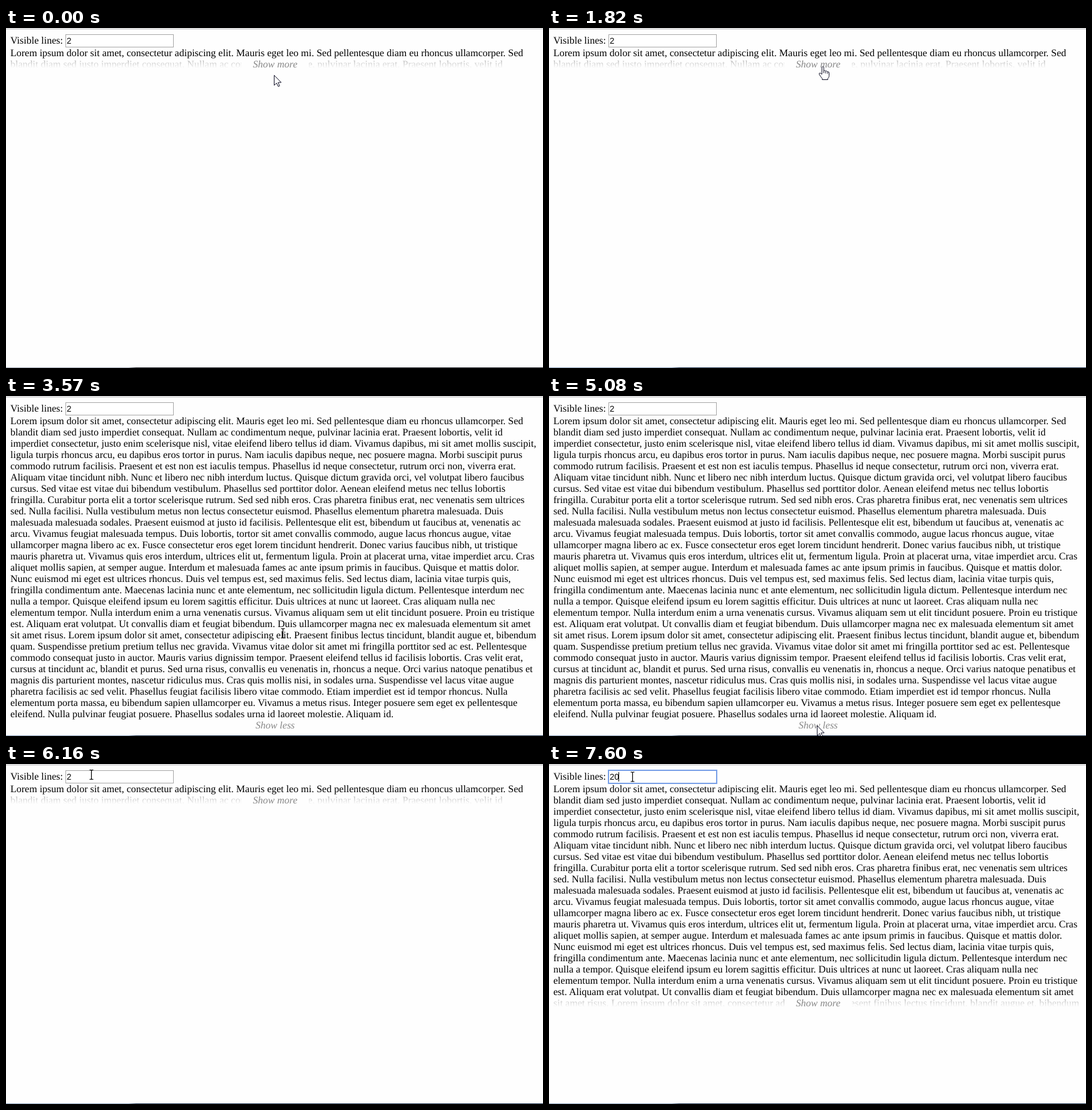
Animation, 858 px wide and 543 px high, one loop 8 s. Source, as an HTML page:

```html
<!DOCTYPE html>
<html lang="en">
<head>
<meta charset="utf-8">
<title>Show more, show less</title>
<style>
html, body { margin: 0; width: 100%; height: 100%; overflow: hidden; background: #fefefe; }
#stage { position: relative; width: 858px; height: 543px; overflow: hidden;
  font: 16px/18px "Liberation Serif", "Times New Roman", serif; color: #000; text-rendering: geometricPrecision; }
#stage > * { position: absolute; box-sizing: border-box; margin: 0; white-space: pre; }
#top { left: 0; top: 1px; width: 858px; height: 1px; background: #b0b0b3; }
#bottom { left: 0; top: 542px; width: 858px; height: 1px; }
#label { left: 7px; top: 12px; }
#field { left: 95px; top: 10px; width: 173px; height: 21px; border: 1px solid #a9a9a9; background: #fff;
  padding-left: 1px; font: 13.333px/19px "Liberation Sans", Arial, sans-serif; }
#field.focused { border-color: #6d97e4; box-shadow: 0 0 0 1px #87abeb; }
#caret { top: 13px; width: 1px; height: 15px; background: #000; }
#text { left: 7px; top: 31px; width: 851px; padding-top: 1px; overflow: hidden; font: inherit; }
#fade { left: 0; width: 858px; height: 18px;
  background: linear-gradient(rgba(254,254,254,.66), #fefefe 15px); }
#toggle { left: 376px; width: 108px; height: 18px; padding-top: 1px; text-align: center; font-style: italic;
  color: #888; background: #fefefe; }
#cursor { left: 0; top: 0; width: 858px; height: 543px; }
</style>
</head>
<body>
<div id="stage">
<div id="top"></div>
<div id="label">Visible lines:</div>
<div id="field"></div>
<div id="caret"></div>
<pre id="text">Lorem ipsum dolor sit amet, consectetur adipiscing elit. Mauris eget leo mi. Sed pellentesque diam eu rhoncus ullamcorper. Sed
blandit diam sed justo imperdiet consequat. Nullam ac condimentum neque, pulvinar lacinia erat. Praesent lobortis, velit id
imperdiet consectetur, justo enim scelerisque nisl, vitae eleifend libero tellus id diam. Vivamus dapibus, mi sit amet mollis suscipit,
ligula turpis rhoncus arcu, eu dapibus eros tortor in purus. Nam iaculis dapibus neque, nec posuere magna. Morbi suscipit purus
commodo rutrum facilisis. Praesent et est non est iaculis tempus. Phasellus id neque consectetur, rutrum orci non, viverra erat.
Aliquam vitae tincidunt nibh. Nunc et libero nec nibh interdum luctus. Quisque dictum gravida orci, vel volutpat libero faucibus
cursus. Sed vitae est vitae dui bibendum vestibulum. Phasellus sed porttitor dolor. Aenean eleifend metus nec tellus lobortis
fringilla. Curabitur porta elit a tortor scelerisque rutrum. Sed sed nibh eros. Cras pharetra finibus erat, nec venenatis sem ultrices
sed. Nulla facilisi. Nulla vestibulum metus non lectus consectetur euismod. Phasellus elementum pharetra malesuada. Duis
malesuada malesuada sodales. Praesent euismod at justo id facilisis. Pellentesque elit est, bibendum ut faucibus at, venenatis ac
arcu. Vivamus feugiat malesuada tempus. Duis lobortis, tortor sit amet convallis commodo, augue lacus rhoncus augue, vitae
ullamcorper magna libero ac ex. Fusce consectetur eros eget lorem tincidunt hendrerit. Donec varius faucibus nibh, ut tristique
mauris pharetra ut. Vivamus quis eros interdum, ultrices elit ut, fermentum ligula. Proin at placerat urna, vitae imperdiet arcu. Cras
aliquet mollis sapien, at semper augue. Interdum et malesuada fames ac ante ipsum primis in faucibus. Quisque et mattis dolor.
Nunc euismod mi eget est ultrices rhoncus. Duis vel tempus est, sed maximus felis. Sed lectus diam, lacinia vitae turpis quis,
fringilla condimentum ante. Maecenas lacinia nunc et ante elementum, nec sollicitudin ligula dictum. Pellentesque interdum nec
nulla a tempor. Quisque eleifend ipsum eu lorem sagittis efficitur. Duis ultrices at nunc ut laoreet. Cras aliquam nulla nec
elementum tempor. Nulla interdum enim a urna venenatis cursus. Vivamus aliquam sem ut elit tincidunt posuere. Proin eu tristique
est. Aliquam erat volutpat. Ut convallis diam et feugiat bibendum. Duis ullamcorper magna nec ex malesuada elementum sit amet
sit amet risus. Lorem ipsum dolor sit amet, consectetur adipiscing elit. Praesent finibus lectus tincidunt, blandit augue et, bibendum
quam. Suspendisse pretium pretium tellus nec gravida. Vivamus vitae dolor sit amet mi fringilla porttitor sed ac est. Pellentesque
commodo consequat justo in auctor. Mauris varius dignissim tempor. Praesent eleifend tellus id facilisis lobortis. Cras velit erat,
cursus at tincidunt ac, blandit et purus. Sed urna risus, convallis eu venenatis in, rhoncus a neque. Orci varius natoque penatibus et
magnis dis parturient montes, nascetur ridiculus mus. Cras quis mollis nisi, in sodales urna. Suspendisse vel lacus vitae augue
pharetra facilisis ac sed velit. Phasellus feugiat facilisis libero vitae commodo. Etiam imperdiet est id tempor rhoncus. Nulla
elementum porta massa, eu bibendum sapien ullamcorper eu. Vivamus a metus risus. Integer posuere sem eget ex pellentesque
eleifend. Nulla pulvinar feugiat posuere. Phasellus sodales urna id laoreet molestie. Aliquam id.</pre>
<div id="fade"></div>
<div id="toggle"></div>
<div id="bottom"></div>
<svg id="cursor" viewBox="0 0 858 543" stroke-linejoin="round">
  <!-- each pointer is drawn around its hot spot -->
  <path id="arrow" d="M.5 .5V16.5L4.3 13 7 18.5 9.2 17.5 6.7 12H11.7Z" fill="#fff" stroke="#15152a"/>
  <g id="hand" fill="#fff" stroke="#15152a">
    <path d="M-1 13V1.6Q.5-.4 2 1.6V7.5Q3.5 5.8 5 8Q6.5 6.6 8 9Q10.5 8 10.5 11V15.5Q10.5 18 8.5 19.5V21.5H-.5V19.5Q-3 17-5.2 13Q-5.8 10.5-3.5 11Z"/>
    <path d="M2 7.5V11M5 8.5V11.5M8 9.5V12" fill="none"/>
  </g>
  <path id="beam" d="M-3-7.5H-1L0-6.8 1-7.5H3M0-7V7M-3 7.5H-1L0 6.8 1 7.5H3" fill="none" stroke="#000" stroke-width="1.2"/>
</svg>
</div>
<script>
const LOOP = 8000, LINE = 18, TEXT_TOP = 31, ALL_LINES = 27;
const $ = id => document.getElementById(id);

// start time, pointer, hot spot x, y
const pointer = [
  [0, 'arrow', 428, 75], [120, 'hand', 437, 64], [390, 'hand', 437, 61],
  [1940, 'beam', 437.5, 62.5], [2190, 'beam', 437.5, 61], [2590, 'beam', 438.5, 99],
  [2740, 'beam', 447.5, 180], [2870, 'beam', 453.5, 269], [3020, 'beam', 430.5, 340],
  [3140, 'beam', 406.5, 396], [3290, 'beam', 418.5, 378], [3420, 'beam', 429.5, 365],
  [3570, 'beam', 442.5, 379], [3710, 'beam', 434.5, 440], [3840, 'beam', 428.5, 511],
  [3990, 'beam', 428.5, 514], [4150, 'hand', 429, 522], [4290, 'hand', 430, 525],
  [4950, 'hand', 428, 526], [5080, 'arrow', 428, 526], [5490, 'arrow', 255, 61],
  [5620, 'none', 0, 0], [5890, 'arrow', 181, -9], [6040, 'arrow', 150, 2],
  [6160, 'beam', 136.5, 17], [6310, 'beam', 133.5, 20.5]
];

function drawPointer(t) {
  const [, shape, x, y] = pointer.findLast(step => t >= step[0]);
  for (const id of ['arrow', 'hand', 'beam']) {
    $(id).style.display = id === shape ? '' : 'none';
    $(id).setAttribute('transform', `translate(${x} ${y})`);
  }
}

function drawText(t) {
  const expanded = t >= 1940 && t < 5210;
  const lines = expanded ? ALL_LINES : t < 7600 ? 2 : 20;
  const lastTop = TEXT_TOP + (lines - 1) * LINE;
  $('text').style.height = lines * LINE + 'px';
  $('fade').style.top = lastTop + 'px';
  $('fade').style.display = expanded ? 'none' : '';
  $('toggle').style.top = lastTop + (expanded ? LINE : 0) + 'px';
  $('toggle').textContent = expanded ? 'Show less' : 'Show more';
}

function drawField(t) {
  const typed = t >= 7600;
  $('field').textContent = typed ? '20' : '2';
  $('field').className = t >= 6460 ? 'focused' : '';
  $('caret').style.left = (typed ? 111 : 104) + 'px';
  $('caret').style.display = typed || (t >= 6460 && t < 7040) ? '' : 'none';
}

function draw(t) {
  drawText(t);
  drawField(t);
  drawPointer(t);
  const dark = t < 1820 ? '#25272d' : '#253a55';
  const light = t < 1820 ? '#a3a9b6' : '#8fa5bf';
  $('bottom').style.background = `linear-gradient(90deg, ${light} 196px, ${dark} 208px)`;
}

const start = performance.now();
function tick() {
  draw((performance.now() - start) % LOOP);
  requestAnimationFrame(tick);
}
draw(0);
requestAnimationFrame(tick);
</script>
</body>
</html>
```
